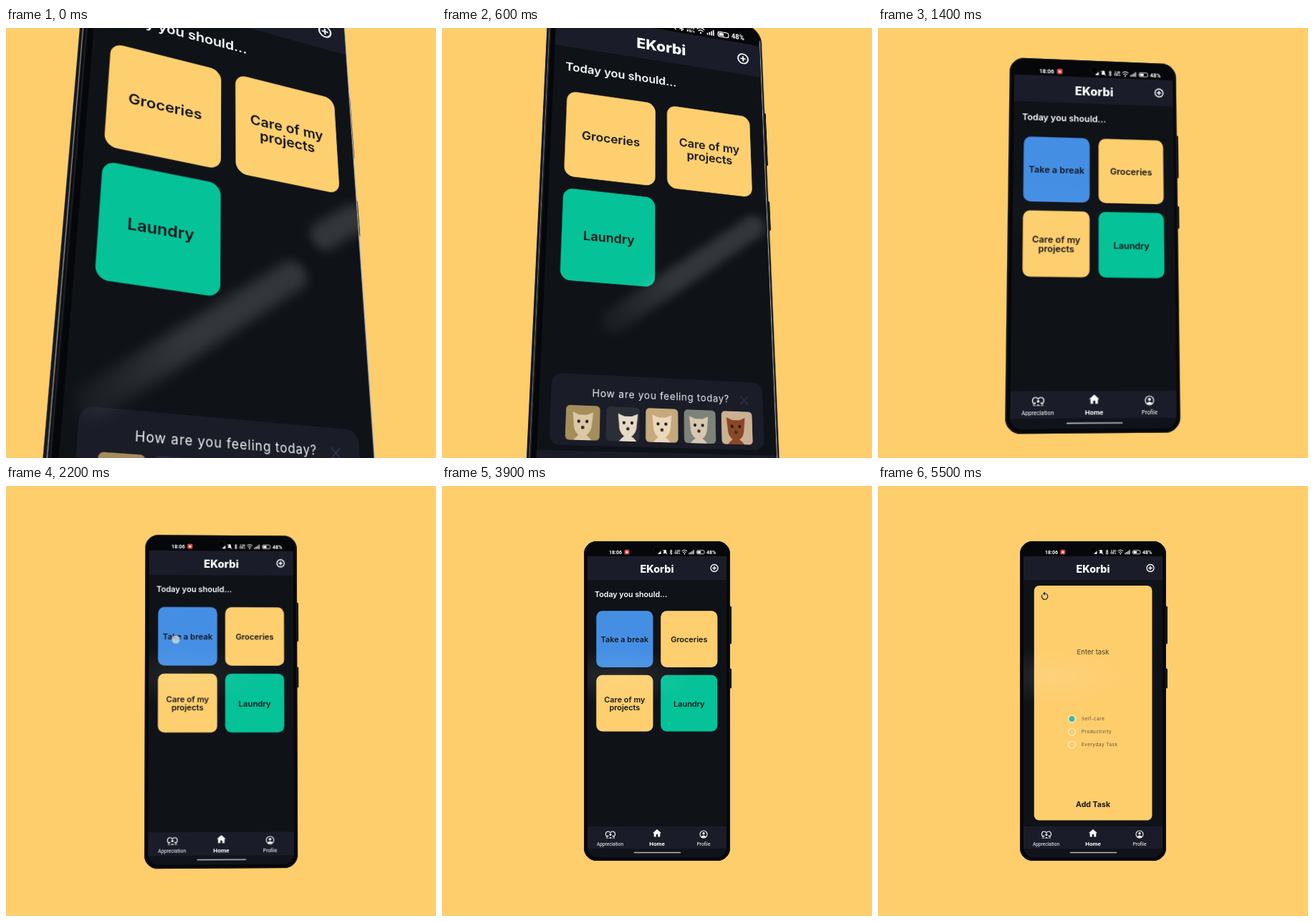
Write an HTML page that moves like this. It is 600x600 px and loops after 5600 ms.

```html
<!DOCTYPE html>
<html lang="en">
<head>
<meta charset="utf-8">
<title>Task app on a phone</title>
<style>
  html, body { margin: 0; width: 100%; height: 100%; overflow: hidden; background: #fecd6c; }
  #stage { position: relative; width: 600px; height: 600px; overflow: hidden; }
  svg { position: absolute; left: 0; top: 0; width: 600px; height: 600px; transform-origin: 300px 300px; }
  text { font-family: Inter, sans-serif; text-anchor: middle; }
  .start { text-anchor: start; }
  .ui { font-family: Roboto, sans-serif; fill: #fff; }
  .line { fill: none; stroke-linecap: round; stroke-linejoin: round; }
</style>
</head>
<body>
<div id="stage">
  <svg id="side">
    <path d="M402.5 169v50M402.5 256v25" stroke="#17181c" stroke-width="3" stroke-linecap="round"/>
    <rect x="198.500" y="77.500" width="203" height="445" rx="17" fill="#0c0d10" stroke="#1b1c20"/>
    <path id="edge" d="M200.200 94v412" stroke="#85878d" stroke-width=".7"/>
  </svg>

  <svg id="phone">
    <defs>
      <radialGradient id="sheen">
        <stop offset="0" stop-color="#fff" stop-opacity=".1"/><stop offset="1" stop-color="#fff" stop-opacity="0"/>
      </radialGradient>
      <linearGradient id="beam" gradientUnits="userSpaceOnUse" x1="-70" y1="52" x2="68" y2="-51">
        <stop offset="0" stop-color="#fff" stop-opacity=".3"/><stop offset=".4" stop-color="#fff"/>
        <stop offset="1" stop-color="#fff"/>
      </linearGradient>
      <filter id="soft" filterUnits="userSpaceOnUse" x="-120" y="-140" width="280" height="240"><feGaussianBlur stdDeviation="4"/></filter>
      <clipPath id="glass"><rect x="203" y="81" width="194" height="437" rx="14"/></clipPath>
    </defs>
    <rect id="body" x="198.500" y="77.500" width="203" height="445" rx="17" fill="#06070a" stroke="#1b1c20"/>
    <g clip-path="url(#glass)">
      <rect x="203" y="98" width="194" height="420" fill="#0f1217"/>
      <rect x="203" y="98" width="194" height="33" fill="#1a1d29"/>
      <rect x="203" y="475" width="194" height="31" fill="#1a1d29"/>
      <rect x="203" y="506" width="194" height="12" fill="#11131a"/>
    </g>
    <path id="shine" d="M397.800 92v416" stroke="#b9bbc0" stroke-width=".8"/>
    <path d="M268.5 511.500h64" stroke="#b4b5b9" stroke-width="1.600" stroke-linecap="round"/>

    <!-- status bar -->
    <g class="ui">
      <text x="242" y="94.700" font-size="7" font-weight="700" class="ui">18:06</text>
      <text x="375.500" y="94.700" font-size="7" font-weight="600" class="ui">48%</text>
      <text x="328.500" y="91.800" font-size="3.800" font-weight="700" class="ui">2.00</text>
      <text x="328.500" y="95.300" font-size="3.600" font-weight="700" class="ui">KB/s</text>
      <rect x="254.500" y="88.800" width="6.800" height="6.800" rx="1.600" fill="#e8453f"/>
      <circle cx="257.900" cy="92.200" r="1.500"/>
      <circle cx="300" cy="88.500" r="4.300" fill="#000" stroke="#1d1e23" stroke-width=".8"/>
      <path d="M301 95h4.500v-4.500zM308.500 94h5.500l-1-1.500v-2a1.800 1.800 0 0 0-3.500 0v2z"/>
      <path class="line" stroke="#fff" stroke-width=".8" d="M308.300 89.300l5.800 6M317.800 90.500l3.500 3.300-1.800 1.700v-6.500l1.800 1.700-3.500 3.300"/>
      <path class="line" stroke="#fff" stroke-width="1" d="M334.800 90.600a5 5 0 0 1 7 0M336.200 92.500a3 3 0 0 1 4.200 0"/>
      <circle cx="338.300" cy="94.500" r=".9"/>
      <path stroke="#fff" stroke-width="1.200" d="M345 95.300v-2M347 95.300v-3.300M349 95.300v-4.600M351 95.300v-6"/>
      <rect x="355.500" y="89.800" width="10.500" height="5" rx="1.500" fill="none" stroke="#fff" stroke-width=".8"/>
      <rect x="356.500" y="90.800" width="4.500" height="3"/>
    </g>

    <!-- header -->
    <text x="300" y="121" font-size="14.300" font-weight="800" fill="#fff">EKorbi</text>
    <circle cx="380" cy="114.500" r="5" fill="none" stroke="#fff" stroke-width="1.300"/>
    <path stroke="#fff" stroke-width="1.300" d="M377.300 114.500h5.400M380 111.800v5.400"/>

    <!-- bottom navigation -->
    <g class="ui">
      <path class="line" stroke="#fff" stroke-width="1.200" d="M230 489.500c-3-3-1.500-7.500 2-7.500 1.600 0 2.500 1.200 3 2 .5-.8 1.400-2 3-2 3.500 0 5 4.500 2 7.500"/>
      <circle cx="235" cy="486.500" r="1.500"/><circle cx="231.300" cy="488.500" r="1"/><circle cx="238.700" cy="488.500" r="1"/>
      <path d="M228.500 491.500q2-2 4 0 2.500-3 5 0 2-2 4 0z"/>
      <path d="M300 479l6 5.300h-1.700v5.200h-3v-3.500h-2.600v3.500h-3v-5.200H294z"/>
      <circle cx="365" cy="486" r="5" fill="none" stroke="#fff" stroke-width="1.100"/>
      <circle cx="365" cy="484.700" r="1.700"/>
      <path d="M361.500 489.200q3.500-3.500 7 0-3.500 3-7 0z"/>
      <text x="234.500" y="502" font-size="6.600" class="ui">Appreciation</text>
      <text x="300" y="502" font-size="8" font-weight="700" class="ui">Home</text>
      <text x="365" y="502" font-size="6.600" class="ui">Profile</text>
    </g>

    <text x="213" y="154.500" font-size="10.700" font-weight="600" fill="#fff" class="start">Today you should...</text>
    <g id="before"></g>
    <g id="after"></g>
    <g id="mood" transform="translate(.5 2)">
      <rect x="211.500" y="415" width="175" height="54" rx="8" fill="#1a1c28"/>
      <text x="300.300" y="432" font-size="8" letter-spacing=".42" fill="#f2f2f4">How are you feeling today?</text>
      <path class="line" stroke="#2c2f47" stroke-width="1" d="M367 427l6 6m0-6l-6 6"/>
    </g>
    <circle id="touch" cx="239" cy="218" r="5.500" fill="#d3d6da" opacity=".8"/>

    <g id="detail">
      <rect x="203" y="131" width="194" height="344" fill="#0f1217"/>
      <rect x="217.800" y="139" width="164.700" height="327.500" rx="7" fill="#448fe4"/>
      <g class="back"></g>
      <path class="line" stroke="#16243a" stroke-width="1.100" d="M362.800 149.700h7.600M365 149.500v-1h3v1M363.800 151.500h5.600v6.500h-5.600z"/>
      <text x="300.500" y="184" font-size="13" font-weight="300" letter-spacing="1.300" fill="#0f1a2a">Self Care</text>
      <text x="300" y="310" font-size="15.700" font-weight="600" fill="#0b1018">Take a break</text>
      <text x="300" y="448" font-size="10.700" font-weight="600" fill="#0b1018">Mark as done!</text>
    </g>

    <g id="add">
      <rect x="203" y="131" width="194" height="344" fill="#0f1217"/>
      <rect x="217.800" y="139" width="164.700" height="327.500" rx="7" fill="#fecd6c"/>
      <g class="back"></g>
      <text x="300" y="234.500" font-size="9.500" fill="#4b4230">Enter task</text>
      <g id="choices"></g>
      <text x="300" y="448" font-size="10.600" font-weight="700" fill="#17171a">Add Task</text>
    </g>

    <g clip-path="url(#glass)">
      <ellipse id="glow" cx="245" cy="266" rx="115" ry="40" fill="url(#sheen)"/>
      <g id="streak">
        <g filter="url(#soft)" stroke="url(#beam)" stroke-width="20" stroke-linecap="round">
          <path d="M-66 49L60 -45"/><path d="M84 -77L110 -96"/>
        </g>
      </g>
    </g>
  </svg>
</div>

<script>
const LOOP = 5600, STEP = 100;
const $ = id => document.getElementById(id);
const clamp = v => Math.min(1, Math.max(0, v));

const YELLOW = '#fecf6e', GREEN = '#05c298', BLUE = '#448fe4';
const tasks = [['Take a break', BLUE], ['Groceries', YELLOW], ['Care of my|projects', YELLOW], ['Laundry', GREEN]];

function tile([label, color], slot) {
  const x = 215.3 + (slot % 2) * 89.9, y = 174.2 + Math.floor(slot / 2) * 89.5;
  const lines = label.split('|');
  const text = lines.map((line, i) =>
    `<text x="${x + 39.6}" y="${y + 44 + (i - (lines.length - 1) / 2) * 11.4}" font-size="10.9" font-weight="600" fill="#14161b">${line}</text>`);
  return `<rect x="${x}" y="${y}" width="79.2" height="78.9" rx="8.5" fill="${color}"/>${text.join('')}`;
}
$('before').innerHTML = tasks.slice(1).map(tile).join('');
$('after').innerHTML = tasks.map(tile).join('');

// soft stand-ins for the pet pictures: backdrop, fur, horizontal shift
const pets = [['#a58d5c', '#dcc8a4', 0], ['#2b2e36', '#e8dac8', 4], ['#c6a97c', '#ead8bb', 0],
              ['#7d8378', '#d8c8b2', -1], ['#cbb193', '#8b4727', -1]];
$('mood').innerHTML += pets.map(([back, fur, shift], i) => {
  const x = 223.5 + i * 31.6, c = x + 13.3 + shift;
  return `<rect x="${x}" y="439" width="26.6" height="26" rx="3" fill="${back}"/>
    <path d="M${c - 8} 444l5 2h6l5-2-1 9a7 9 0 0 1-14 0z" fill="${fur}"/>
    <path d="M${c - 7} 465q7-9 14 0z" fill="${fur}"/>
    <circle cx="${c - 3.2}" cy="451" r="1.2" fill="#1d1814"/><circle cx="${c + 3.2}" cy="451" r="1.2" fill="#1d1814"/>
    <circle cx="${c}" cy="455.5" r="1.3" fill="#3a2a22"/>`;
}).join('');

$('choices').innerHTML = ['Self-care', 'Productivity', 'Everyday Task'].map((label, i) => {
  const y = 325 + i * 18;
  return `<circle cx="270.5" cy="${y}" r="5" fill="none" stroke="${i ? '#fff0c4' : '#e8f3d4'}" stroke-width="1.2"/>
    ${i ? '' : `<circle cx="270.5" cy="${y}" r="3.9" fill="#3fb7a4"/>`}
    <text class="start" x="284" y="${y + 2.3}" font-size="6.3" letter-spacing=".55" fill="#5d5037">${label}</text>`;
}).join('');

document.querySelectorAll('.back').forEach(g => g.innerHTML =
  '<path class="line" stroke="#20242c" stroke-width="1.2" d="M229 152.200a4.200 4.200 0 1 0 3.800-2.200h-1.300"/><path d="M233 147.500v5l-3-2.500z" fill="#20242c"/>');

// how far the camera still is from the frontal view, 1 to 0
const knots = [[0, 1], [600, .58], [1400, .165], [2200, .042], [2800, .009], [3700, 0]];
function tilt(t) {
  const last = knots.length - 1;
  if (t >= knots[last][0]) return 0;
  const slope = i => {
    const [a, b] = [knots[Math.max(0, i - 1)], knots[Math.min(last, i + 1)]];
    return (b[1] - a[1]) / (b[0] - a[0]);
  };
  const i = knots.findIndex(k => t < k[0]) - 1;
  const [t0, p0] = knots[i], [t1, p1] = knots[i + 1];
  const d = t1 - t0, s = (t - t0) / d, r = 1 - s;
  return p0 * (1 + 2 * s) * r * r + slope(i) * d * s * r * r + p1 * s * s * (3 - 2 * s) - slope(i + 1) * d * s * s * r;
}

function perspective(p, shift = 0) {
  const sx = 1 + 1.01 * p, sy = 1 + .767 * p, skew = .548 * p ** 1.3;
  const g = .000675 * p, h = -.000762 * p;
  const dx = 10.5 * p + shift, dy = -10.1 * p;
  const m = [sx + dx * g, skew - 300 * g, 0, g, dx * h, sy - 300 * h, 0, h, 0, 0, 1, 0, dx, dy, 0, 1];
  return `matrix3d(${m.map(v => v.toFixed(8))})`;
}

const rise = (t, at) => clamp((t - at + 100) / 200);

function draw(t) {
  const p = tilt(t), q = 1 - p;
  $('phone').style.transform = perspective(p);
  $('side').style.transform = perspective(p, -9 * p ** 1.3);
  $('body').setAttribute('width', 203 - 4 * p);
  $('edge').style.opacity = $('shine').style.opacity = clamp(2 * p - .3);

  $('before').style.opacity = t < 1000 ? 1 : 0;
  $('after').style.opacity = t < 1000 ? 0 : 1;
  $('mood').style.opacity = 1 - rise(t, 1000);
  $('touch').style.opacity = t >= 2100 && t < 2400 ? .8 : 0;
  $('detail').style.opacity = rise(t, 2450) - rise(t, 3400);
  $('add').style.opacity = rise(t, 4600);

  $('glow').style.opacity = clamp((q - .8) / .2);
  $('streak').style.opacity = .15 * clamp((p - .2) / .35);
  $('streak').setAttribute('transform', `translate(${285.6 + 94 * q} ${365 - 95 * q})`);
}

const begin = performance.now();
function frame(now) {
  const t = Math.max(0, now - begin) % LOOP;
  draw(Math.floor(t / STEP) * STEP);
  requestAnimationFrame(frame);
}
draw(0);
requestAnimationFrame(frame);
</script>
</body>
</html>
```
